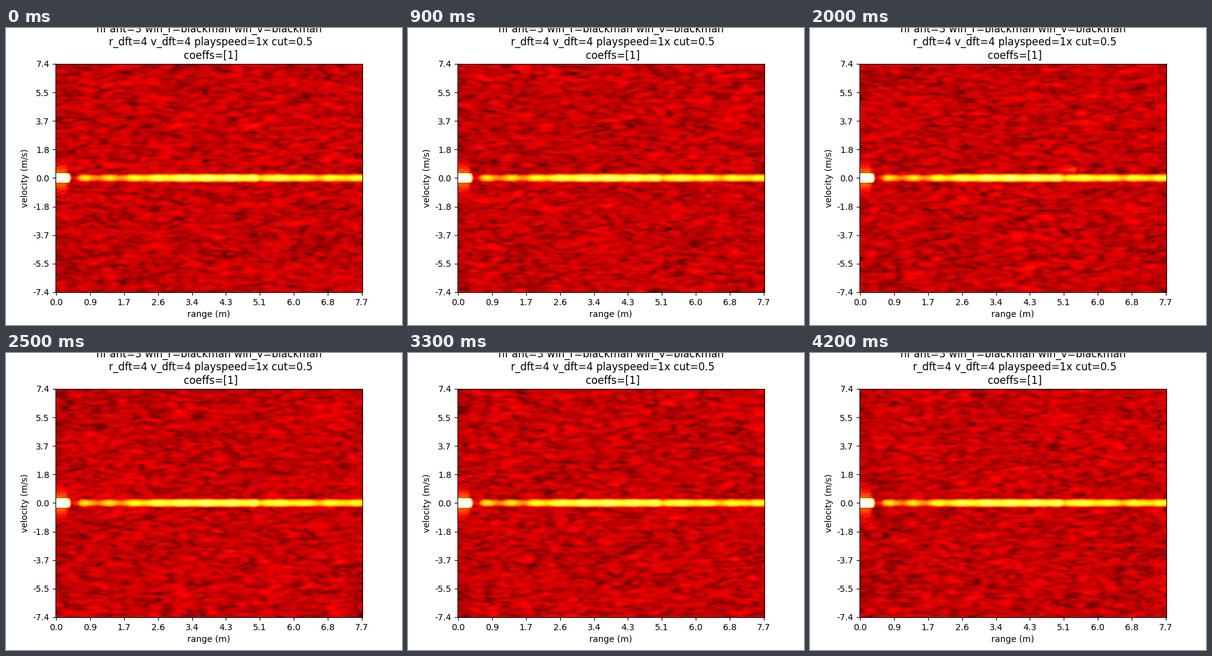
A matplotlib script that plays this animation: 640x480 px, repeating every 4.3 s.

```python
import numpy as np
import matplotlib.pyplot as plt
from matplotlib.animation import FuncAnimation

FRAMES, INTERVAL = 43, 100
ANTENNAS, CHIRPS, SAMPLES, PAD = 3, 128, 128, 4
ROWS, COLS = CHIRPS * PAD, SAMPLES * PAD // 2
MAX_RANGE, MAX_SPEED = 7.7, 7.37
FLOOR, GAIN = 0.283, 0.122      # colour level of the noise, level per neper

win_v = np.blackman(CHIRPS)
window = win_v[:, None] * np.blackman(SAMPLES)
ranges = np.linspace(0, MAX_RANGE, COLS)
edge = 1 - 0.25 * np.exp(-np.arange(COLS) / 6)


def bump(center, width):
    return np.exp(-((ranges - center) / width) ** 2)


def doppler(speed):
    """Windowed spectrum of one target moving at the given speed."""
    cycles = -speed / (2 * MAX_SPEED) * np.arange(CHIRPS)
    spectrum = np.fft.fft(win_v * np.exp(2j * np.pi * cycles), ROWS)
    return np.fft.fftshift(spectrum)[:, None] / win_v.sum()


def echo_level():
    """Colour level along the line of zero velocity."""
    leak = 1.4 - 0.4 * (ranges / 0.335) ** 8
    trend = np.interp(ranges, (0.37, 0.5, 0.62, 1.5, 2.5, 3.4, 5.0, 6.4, 7.7),
                      (0.44, 0.45, 0.65, 0.66, 0.81, 0.86, 0.85, 0.76, 0.79))
    depth = np.interp(ranges, (1.6, 2.6), (0.08, 0.03))
    ripple = depth * np.cos(2 * np.pi * (ranges - 0.73) / 0.614)
    dips = (0.14 * bump(5.15, 0.09) + 0.07 * bump(6.65, 0.12)
            + 0.06 * bump(7.37, 0.12))
    return np.maximum(leak, trend + ripple - dips)


def noise(rng):
    data = rng.standard_normal((ANTENNAS, CHIRPS, SAMPLES)) * window
    spectrum = np.fft.rfft(data, SAMPLES * PAD, axis=2)[..., :COLS]
    spectrum = np.fft.fftshift(np.fft.fft(spectrum, ROWS, axis=1), axes=1)
    return spectrum / np.abs(spectrum).mean() * edge


def walker(t):
    """Faint target that speeds up, slows down and turns back."""
    speed = 0.53 * np.cos((t - 2.0) * 4.2)
    place = 5.3 - 0.5 * max(t - 2.1, 0)
    strength = 4 * np.exp(-((t - 2.0) / 0.35) ** 2)
    return strength * bump(place, 0.26) * doppler(speed)


STANDING = np.exp((echo_level() - FLOOR) / GAIN) * doppler(0)


def radar_map(i):
    rng = np.random.default_rng(100 + i)
    field = noise(rng) + STANDING + walker(i * INTERVAL / 1000)
    strength = np.abs(field).mean(axis=0)
    return np.clip(FLOOR + GAIN * np.log(strength + 1e-6), 0, 1)


fig, ax = plt.subplots(figsize=(6.4, 4.8), dpi=100)
image = ax.imshow(radar_map(0), cmap="hot", vmin=0, vmax=1, aspect="auto")
ax.set_title("nf ant=3 win_r=blackman win_v=blackman\n"
             " r_dft=4 v_dft=4 playspeed=1x cut=0.5\n coeffs=[1]")
ax.set_xlabel("range (m)")
ax.set_ylabel("velocity (m/s)")
ax.set_xticks(np.linspace(0, COLS - 1, 10),
              [f"{r:.1f}" for r in np.linspace(0, MAX_RANGE, 10)])
ax.set_yticks(np.linspace(0, ROWS - 1, 9),
              [f"{v:.1f}" for v in np.linspace(MAX_SPEED, -MAX_SPEED, 9)])


def update(i):
    image.set_data(radar_map(i))
    return image,


anim = FuncAnimation(fig, update, frames=FRAMES, interval=INTERVAL, repeat=True)
plt.show()
```
